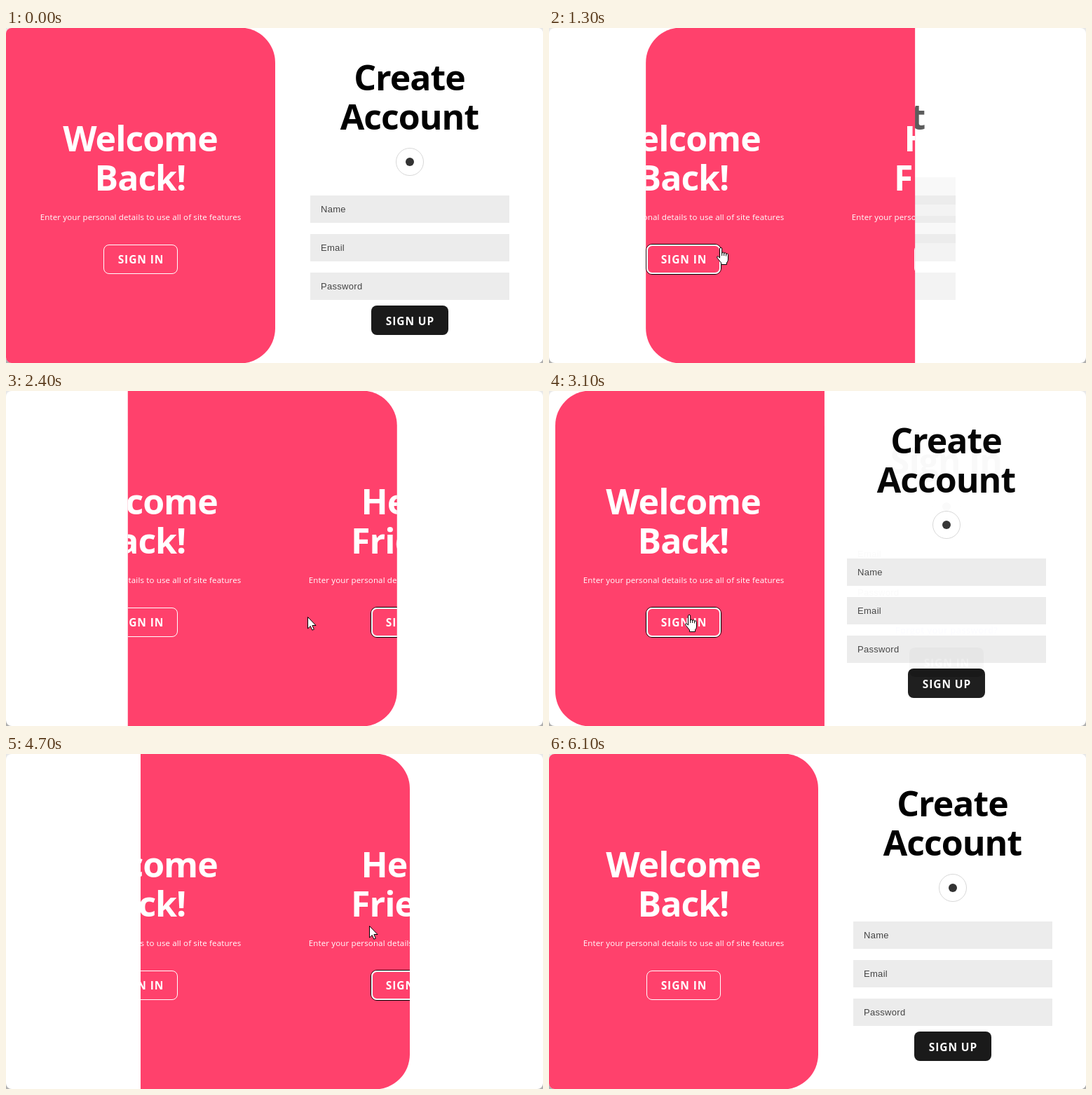
An HTML page with a canvas for the animation above (6.2 s loop, 766 by 478 pixels).

```html
<!DOCTYPE html>
<html lang="en">
<head>
<meta charset="utf-8">
<title>Sliding login panel</title>
<style>
  html, body { margin: 0; width: 100%; height: 100%; overflow: hidden; background: #fff; }
  canvas { display: block; }
</style>
</head>
<body>
<canvas id="stage" width="766" height="478"></canvas>
<script>
const W = 766, H = 478, HALF = 384;
const LOOP = 6200, STEP = 100, SLIDE = 580;
const PINK = '#ff416c';
const SANS = '"Open Sans", sans-serif';
const ARIAL = '"Liberation Sans", Arial, sans-serif';
const stage = document.getElementById('stage').getContext('2d');

// Each click sends the panel to one side (0 left, 1 right).
const slides = [
  { start: 1058, to: 1 },
  { start: 2094, to: 0 },
  { start: 3037, to: 1 },
  { start: 4410, to: 0 },
];

// Pointer hotspot: time, x, y
const pointerPath = [
  [100, 628, -24], [900, 200, 328], [1080, 205, 328], [1300, 245, 313],
  [1800, 572, 324], [2150, 570, 330], [2400, 430, 322], [2800, 215, 328],
  [3100, 200, 319], [3600, 557.5, 284], [4000, 565, 325], [4450, 565, 328],
  [4700, 517.5, 245], [5200, 470, -24],
];

const arrowShape = new Path2D('M.5.5V17l3.8-3.5 2.5 5.7 2.5-1.1-2.4-5.6H12z');
const handShape = new Path2D('M4.5 2a1.6 1.6 0 0 1 3.2 0V8.5a1.5 1.5 0 0 1 3 .2V9a1.5 1.5 0 0 1 3 .5v.6' +
  'a1.4 1.4 0 0 1 2.8.6V17q0 3-2 5v2.5H6.5V22L1 15.2q-1-2.6 1-2.6l2.5 2.4z');
const handLines = new Path2D('M7.7 8v4M10.7 9v3M13.7 10v2.5');

// CSS ease-in-out: cubic-bezier(.42, 0, .58, 1)
function easeInOut(x) {
  let lo = 0, hi = 1;
  for (let i = 0; i < 30; i++) {
    const s = (lo + hi) / 2, r = 1 - s;
    const bx = 3 * r * r * s * 0.42 + 3 * r * s * s * 0.58 + s * s * s;
    if (bx < x) lo = s; else hi = s;
  }
  return lo * lo * (3 - 2 * lo);
}

function panelAt(t) {
  const slide = slides.filter(s => s.start <= t).pop();
  if (!slide) return { side: 0, to: 0, progress: 1 };
  const progress = Math.min(1, (t - slide.start) / SLIDE);
  const eased = progress < 1 ? easeInOut(progress) : 1;
  return { side: slide.to ? eased : 1 - eased, to: slide.to, progress };
}

function pointerAt(t) {
  const next = pointerPath.findIndex(k => k[0] > t);
  if (next < 1) return null;
  const [t0, x0, y0] = pointerPath[next - 1], [t1, x1, y1] = pointerPath[next];
  const u = (t - t0) / (t1 - t0), k = u * u * (3 - 2 * u);
  return { x: x0 + (x1 - x0) * k, y: y0 + (y1 - y0) * k };
}

function text(c, str, x, y, font, color, spacing = 0, align = 'center') {
  c.font = font;
  c.fillStyle = color;
  c.letterSpacing = spacing + 'px';
  c.textAlign = align;
  c.fillText(str, x + (align === 'center' ? spacing / 2 : 0), y);
}

function rounded(c, x, y, w, h, r) {
  c.beginPath();
  c.roundRect(x, y, w, h, r);
}

function outline(c, x, y, w, h, r, color, width) {
  rounded(c, x, y, w, h, r);
  c.strokeStyle = color;
  c.lineWidth = width;
  c.stroke();
}

const heading = (c, str, x, y, color) => text(c, str, x, y, `700 50px ${SANS}`, color, -1);
const buttonLabel = (c, str, x, y) => text(c, str, x, y, `700 15.5px ${SANS}`, '#fff', 0.9);

function darkButton(c, label, y, w) {
  rounded(c, 192 - w / 2, y, w, 42, 8);
  c.fillStyle = '#1a1a1a';
  c.fill();
  buttonLabel(c, label, 192, y + 28);
}

function ghostButton(c, label, x, w, focused) {
  const y = 309, h = 42;
  if (focused) {
    outline(c, x - 0.5, y - 0.5, w + 1, h + 1, 8.5, '#000', 1);
    outline(c, x + 1, y + 1, w - 2, h - 2, 7, '#fff', 2);
  } else {
    outline(c, x + 0.5, y + 0.5, w - 1, h - 1, 7.5, '#fff', 1);
  }
  buttonLabel(c, label, x + w / 2, y + 27);
}

function field(c, label, y) {
  c.fillStyle = '#ececec';
  c.fillRect(50, y, 284, 39);
  text(c, label, 65, y + 24, `13px ${ARIAL}`, '#444', 0.3, 'left');
}

function socialButton(c, y) {
  outline(c, 172.5, y - 19.5, 39, 39, 19.5, '#d8d8d8', 1);
  c.beginPath();
  c.arc(192, y, 6, 0, Math.PI * 2);
  c.fillStyle = '#333';
  c.fill();
}

function makeForm(paint) {
  const canvas = document.createElement('canvas');
  canvas.width = HALF;
  canvas.height = H;
  const c = canvas.getContext('2d');
  c.fillStyle = '#fff';
  c.fillRect(0, 0, HALF, H);
  paint(c);
  return canvas;
}

const signIn = makeForm(c => {
  heading(c, 'Sign In', 192, 118, '#000');
  socialButton(c, 165);
  field(c, 'Email', 213);
  field(c, 'Password', 268);
  text(c, 'Forgot your password?', 192, 346, `600 13px ${SANS}`, '#7278f8', 0.2);
  darkButton(c, 'SIGN IN', 366, 106);
});

const signUp = makeForm(c => {
  heading(c, 'Create', 192, 89, '#000');
  heading(c, 'Account', 192, 145, '#000');
  socialButton(c, 191);
  field(c, 'Name', 239);
  field(c, 'Email', 294);
  field(c, 'Password', 349);
  darkButton(c, 'SIGN UP', 396, 110);
});

function greeting(c, x, lines, note) {
  heading(c, lines[0], x, 176, '#fff');
  heading(c, lines[1], x, 232, '#fff');
  text(c, note, x, 274, `11.5px ${SANS}`, '#fff', 0.15);
}

function drawForms(c, { side, to, progress }) {
  const x = Math.round(HALF * (1 - side));
  c.drawImage(signIn, x, 0);
  // Sign-up fades while leaving, but pops in halfway when it returns.
  if (to) c.globalAlpha = side < 0.625 ? 1 - side : 0;
  else c.globalAlpha = progress < 0.5 ? 0 : 1;
  c.drawImage(signUp, x, 0);
  c.globalAlpha = 1;
}

function drawPanel(c, { side, to }) {
  c.save();
  rounded(c, HALF * side, -0.5, HALF, H + 1, to ? [50, 0, 0, 50] : [0, 50, 50, 0]);
  c.fillStyle = PINK;
  c.fill();
  c.clip();
  // The greetings stand still; the panel only uncovers them.
  greeting(c, 192, ['Welcome', 'Back!'], 'Enter your personal details to use all of site features');
  greeting(c, 576, ['Hello,', 'Friend!'], 'Enter your personal details and start journey with us');
  ghostButton(c, 'SIGN IN', 139, 106, to === 1);
  ghostButton(c, 'SIGN UP', 521, 110, to === 0);
  c.restore();
}

function drawPointer(c, spot, side) {
  const { x, y } = spot, left = HALF * side;
  const onButton = y >= 309 && y <= 351 && x >= left && x <= left + HALF &&
    ((x >= 139 && x <= 245) || (x >= 521 && x <= 631));
  c.save();
  c.translate(Math.round(x) - (onButton ? 6 : 0), Math.round(y));
  c.fillStyle = '#fff';
  c.strokeStyle = '#000';
  c.lineWidth = 1;
  c.lineJoin = 'round';
  const shape = onButton ? handShape : arrowShape;
  c.fill(shape);
  c.stroke(shape);
  if (onButton) c.stroke(handLines);
  c.restore();
}

const backdrop = stage.createLinearGradient(0, 0, 0, H);
backdrop.addColorStop(0, '#e8e8e8');
backdrop.addColorStop(1, '#b0b0b0');

function draw(t) {
  const c = stage, panel = panelAt(t), spot = pointerAt(t);
  c.fillStyle = backdrop;
  c.fillRect(0, 0, W, H);
  c.save();
  rounded(c, 0, 0, W, H, 8);
  c.clip();
  c.fillStyle = '#fff';
  c.fillRect(0, 0, W, H);
  drawForms(c, panel);
  drawPanel(c, panel);
  c.restore();
  if (spot) drawPointer(c, spot, panel.side);
}

const begin = performance.now();
function tick() {
  const t = (performance.now() - begin) % LOOP;
  draw(Math.floor(t / STEP) * STEP);
  requestAnimationFrame(tick);
}
tick();
</script>
</body>
</html>
```
